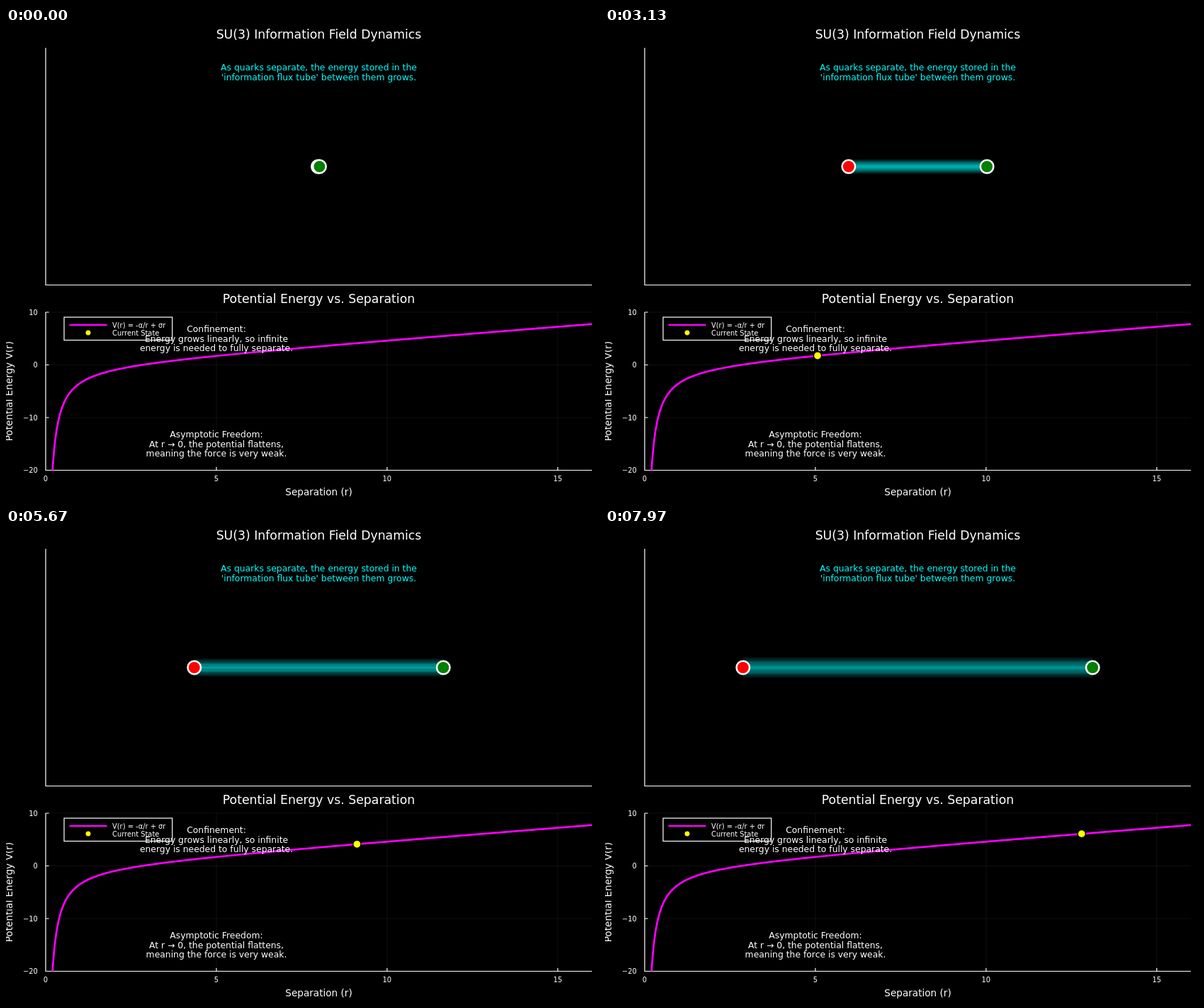
Recreate the animation shown at these times as an HTML page. Size 837 px wide and 669 px high, loop 8 s.

```html
<!DOCTYPE html>
<html lang="en">
<head>
<meta charset="utf-8">
<title>SU(3) Information Field Dynamics</title>
<style>
  html, body { margin: 0; width: 100%; height: 100%; overflow: hidden; background: #000; }
  svg { display: block; width: 837px; height: 669px; }
  text { font-family: "DejaVu Sans", sans-serif; fill: #fff; text-anchor: middle; white-space: pre; }
  .title { font-size: 17.3px; }
  .guide { font-size: 13.6px; }
  .note { font-size: 12.36px; }
  .small { font-size: 9.89px; }
  .cyan text { fill: #0ff; }
  .axis { stroke: #fff; stroke-width: 1.2; fill: none; }
  .grid { stroke: #fff; stroke-opacity: .06; fill: none; }
  .curve { stroke: #f0f; stroke-width: 2.7; fill: none; stroke-linejoin: round; }
  .quark { stroke: #fff; stroke-width: 2.5; }
  .state { fill: #ff0; stroke: #000; stroke-width: 1.4; }
</style>
</head>
<body>
<svg viewBox="0 0 837 669">
  <defs><clipPath id="plot"><rect x="56" y="402" width="771" height="223.5"/></clipPath></defs>

  <text class="title" x="441.5" y="15.3">SU(3) Information Field Dynamics</text>
  <path class="axis" d="M56 28V363.5H827"/>
  <g id="tube" stroke="#0ff" stroke-width="1.3"></g>
  <circle id="red" class="quark" cy="196" r="9.25" fill="#f00"/>
  <circle id="green" class="quark" cy="196" r="9.25" fill="#008000"/>
  <g class="note cyan">
    <text x="441.5" y="59.9">As quarks separate, the energy stored in the</text>
    <text x="441.5" y="73.5">'information flux tube' between them grows.</text>
  </g>

  <text class="title" x="441.5" y="388.8">Potential Energy vs. Separation</text>
  <path id="grid" class="grid"/>
  <path id="axes" class="axis"/>
  <g id="ticks" class="small"></g>
  <text class="guide" x="441.5" y="660.8">Separation (r)</text>
  <text class="guide" transform="translate(9.2 513.7) rotate(-90)">Potential Energy V(r)</text>
  <path id="curve" class="curve" clip-path="url(#plot)"/>
  <circle id="state" class="state" r="5.6"/>

  <rect x="82" y="409" width="152.7" height="32.5" fill="#000" stroke="#fff" stroke-width="1.2"/>
  <path class="curve" d="M89.5 420H142.5"/>
  <circle class="state" cx="116" cy="431" r="4.2"/>
  <g class="small">
    <text x="150" y="423.7" style="text-anchor:start">V(r) = -α/r + σr</text>
    <text x="150" y="434.7" style="text-anchor:start">Current State</text>
  </g>
  <g class="note">
    <text x="297" y="430.3">Confinement:</text>
    <text x="297" y="443.9">Energy grows linearly, so infinite</text>
    <text x="297" y="457.4">energy is needed to fully separate.</text>
    <text x="297" y="579.3">Asymptotic Freedom:</text>
    <text x="297" y="592.9">At r → 0, the potential flattens,</text>
    <text x="297" y="606.4">meaning the force is very weak.</text>
  </g>
</svg>
<script>
  const LOOP = 8000, FPS = 30, STEPS = 300, STRANDS = 30;
  const R_MIN = 0.05, R_MAX = 16, ALPHA = 4, SIGMA = 0.5;
  const MID_X = 441.5, MID_Y = 196, UNIT = 38.55;

  const el = id => document.getElementById(id);
  const set = (node, attrs) => {
    for (const key in attrs) node.setAttribute(key, attrs[key]);
    return node;
  };
  const add = (parent, tag, attrs) =>
    parent.appendChild(set(document.createElementNS('http://www.w3.org/2000/svg', tag), attrs));

  const plotX = r => 56 + r * 771 / 16;
  const plotY = v => 625.5 - (v + 20) * 7.45;
  const separation = i => R_MIN + (R_MAX - R_MIN) * i / (STEPS - 1);
  const potential = r => -ALPHA / r + SIGMA * r;

  function drawAxes() {
    let axes = 'M56 402V625.5H827', grid = '';
    const label = (x, y, value, anchor) => {
      add(el('ticks'), 'text', { x, y, style: 'text-anchor:' + anchor })
        .textContent = String(value).replace('-', '−');
    };
    for (const r of [0, 5, 10, 15]) {
      const x = plotX(r);
      axes += `M${x} 625.5v-4.6`;
      grid += `M${x} 402V625.5`;
      label(x, 641.1, r, 'middle');
    }
    for (const v of [-20, -10, 0, 10]) {
      const y = plotY(v);
      axes += `M56 ${y}h4.6`;
      grid += `M56 ${y}H827`;
      label(44.8, y + 3.6, v, 'end');
    }
    set(el('axes'), { d: axes });
    set(el('grid'), { d: grid });
  }

  function drawCurve() {
    const points = Array.from({ length: STEPS }, (_, i) => {
      const r = separation(i);
      return plotX(r).toFixed(2) + ' ' + plotY(potential(r)).toFixed(2);
    });
    set(el('curve'), { d: 'M' + points.join('L') });
  }

  // Strands run from -1 to 1 across the tube and fade towards its edges.
  const strands = Array.from({ length: STRANDS }, (_, i) => {
    const offset = 2 * i / (STRANDS - 1) - 1;
    const line = add(el('tube'), 'line', { 'stroke-opacity': 0.45 * Math.exp(-2 * offset * offset) });
    return { offset, line };
  });

  function render(time) {
    const step = Math.floor((time % LOOP + 4) * FPS / 1000) % (LOOP * FPS / 1000);
    const r = separation(step), v = potential(r);
    const left = MID_X - r / 2 * UNIT, right = MID_X + r / 2 * UNIT;
    const halfWidth = 7 + 0.55 * r;

    set(el('red'), { cx: left });
    set(el('green'), { cx: right });
    for (const { offset, line } of strands) {
      const y = MID_Y + offset * halfWidth;
      set(line, { x1: left, x2: right, y1: y, y2: y });
    }
    set(el('state'), { cx: plotX(r), cy: plotY(v), visibility: v < -20 ? 'hidden' : 'visible' });
  }

  drawAxes();
  drawCurve();
  const start = performance.now();
  function tick() {
    render(performance.now() - start);
    requestAnimationFrame(tick);
  }
  tick();
</script>
</body>
</html>
```
